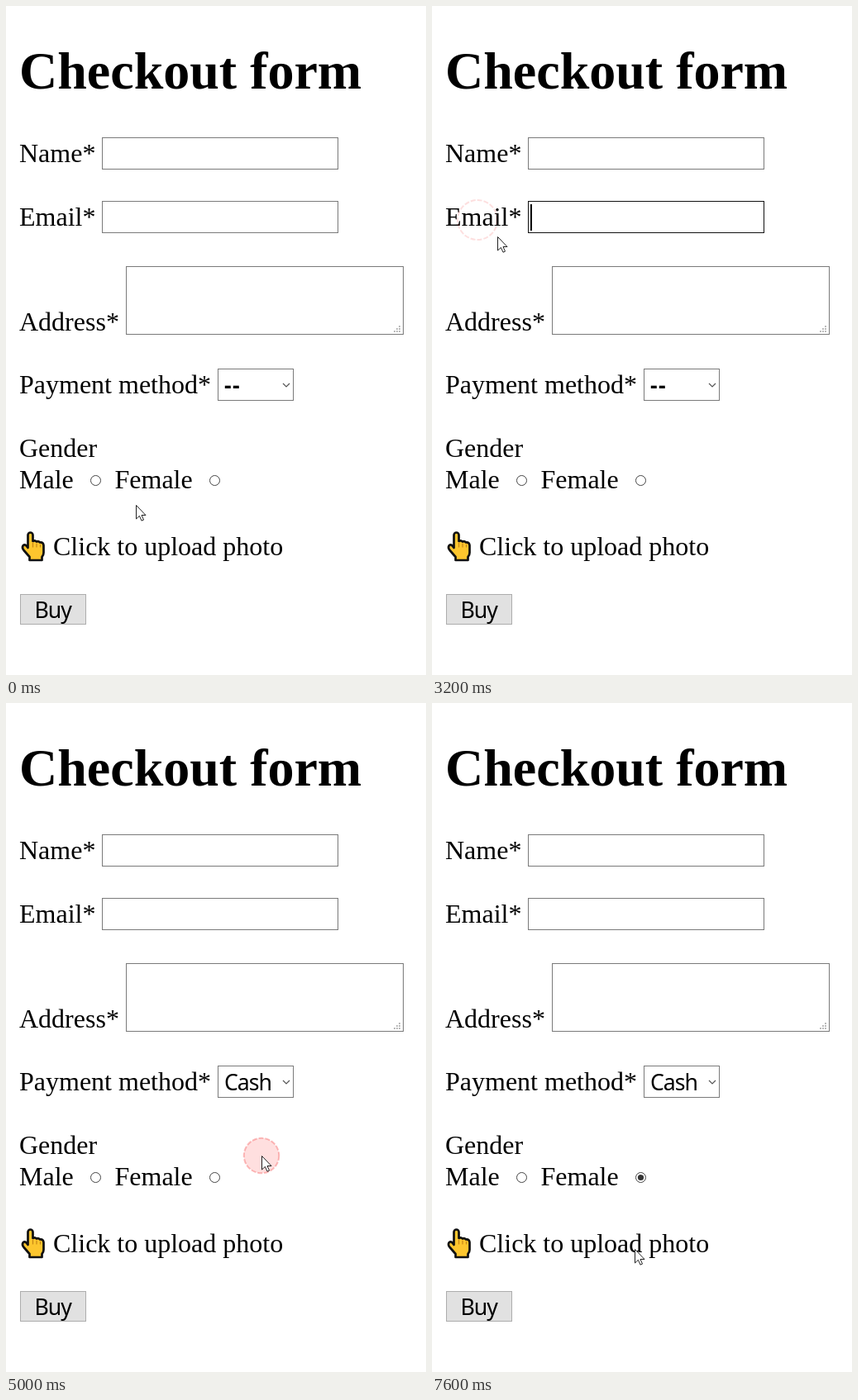
An HTML page for the animation above (8000 ms loop, 508x810 px).

```html
<!DOCTYPE html>
<html lang="en">
<head>
<meta charset="utf-8">
<title>Checkout form</title>
<style>
  html, body { margin: 0; width: 100%; height: 100%; overflow: hidden; background: #fff; }
  svg { display: block; width: 508px; height: 810px; }
  text { font: 32px "Liberation Serif", "Times New Roman", serif; }
  .title { font-size: 64px; font-weight: bold; }
  .ui { font: 26.67px "Noto Sans", "Open Sans", sans-serif; letter-spacing: -1px; }
  .dash { font-weight: 600; letter-spacing: 1.5px; }
  .field { fill: #fff; stroke: #7a7a7a; }
  .field.on { stroke: #111; }
  .radio circle:first-child { fill: #fff; stroke: #444; }
  .radio.on circle:first-child { stroke: #111; }
  .option.on rect { fill: #0078d7; }
  .option.on text { fill: #fff; }
  .off { display: none; }
</style>
</head>
<body>
<svg viewBox="0 0 508 810">
  <text class="title" x="16" y="100">Checkout form</text>
  <text x="16" y="189">Name*</text>
  <text x="16" y="266">Email*</text>
  <text x="16" y="393">Address*</text>
  <text x="16" y="469">Payment method*</text>
  <text x="16" y="546">Gender</text>
  <text x="16" y="584">Male</text>
  <text x="131.5" y="584">Female</text>
  <text x="57" y="665">Click to upload photo</text>

  <rect id="name" class="field" x="116.5" y="159.5" width="285" height="38"/>
  <rect id="email" class="field" x="116.5" y="236.5" width="285" height="38"/>
  <rect id="caret" x="119" width="2" height="32"/>

  <rect class="field" x="145.5" y="315.5" width="335" height="82"/>
  <path d="M475 388h2M472 391h2m1 0h2M469 394h2m1 0h2m1 0h2" stroke="#bbb" stroke-width="2"/>

  <rect id="pay" class="field" x="256.5" y="439.5" width="91" height="38"/>
  <rect id="drop" x="331.5" y="439.5" width="16" height="38" fill="#e5f1fb" stroke="#55748c"/>
  <path d="M335 457l4 4 4-4" fill="none" stroke="#555" stroke-width="1.2"/>
  <text id="none" class="ui dash" x="264" y="469">--</text>
  <text id="cash" class="ui" x="264" y="469">Cash</text>

  <g id="male" class="radio" transform="translate(108.5 574.5)"><circle r="6"/><circle r="3.6" fill="#333"/></g>
  <g id="female" class="radio" transform="translate(252.5 574.5)"><circle r="6"/><circle r="3.6" fill="#333"/></g>

  <g stroke="#111" stroke-width="2.7" stroke-linejoin="round" stroke-linecap="round">
    <path fill="#fdc62e" d="M26.500 656V640.500a3 3 0 0 1 6 0V648q2.500-1.500 4.500.5 2.200-1.200 4 1 4-.5 4.500 3.500V662q0 3-2 5v4H28.500v-4l-7-8q-2.500-3-1-5.500 2-2 4 0z"/>
    <path fill="none" stroke="#c88716" stroke-width="1.2" d="M32.500 650v5M37 651v4M41.500 652v3"/>
  </g>

  <rect x="17.5" y="712.5" width="79" height="36" fill="#e1e1e1" stroke="#adadad"/>
  <text class="ui" x="34.5" y="741">Buy</text>

  <g id="menu">
    <rect x="256.5" y="478.5" width="91" height="152" fill="#fff" stroke="#7a7a7a"/>
    <g class="option" transform="translate(257 479)"><rect width="90" height="50" fill="#fff"/><text class="ui dash" x="7" y="35">--</text></g>
    <g class="option" transform="translate(257 529)"><rect width="90" height="50" fill="#fff"/><text class="ui" x="7" y="35">Cash</text></g>
    <g class="option" transform="translate(257 579)"><rect width="90" height="50" fill="#fff"/><text class="ui" x="7" y="35">Card</text></g>
  </g>

  <circle id="ripple" fill="red" stroke="#f00000" stroke-width="2" stroke-dasharray="6 2"/>
  <path id="cursor" d="M.5.5V17l3.900-3.600 2.600 5.800 2.500-1.100-2.500-5.600h5z" fill="#fff" stroke="#222"/>
</svg>
<script>
const STEP = 200, LOOP = 8000;
const $ = id => document.getElementById(id);
const options = document.querySelectorAll(".option");

// Pointer stops, in steps: it glides there from start to end, then may click.
const stops = [
  { start: 0,  end: 0,  x: 157, y: 604 },
  { start: 0,  end: 4,  x: 63,  y: 169 },
  { start: 8,  end: 9,  x: 63,  y: 181, click: 11 },
  { start: 12, end: 14, x: 55,  y: 259, click: 14 },
  { start: 15, end: 20, x: 282, y: 450, click: 20 },
  { start: 21, end: 24, x: 309, y: 548, click: 24 },
  { start: 25, end: 29, x: 45,  y: 579, click: 29 },
  { start: 30, end: 31, x: 161, y: 558 },
  { start: 31, end: 32, x: 196, y: 575, click: 32 },
  { start: 33, end: 36, x: 242, y: 686 },
  { start: 36, end: 38, x: 245, y: 661 }
];

const show = (el, on) => el.classList.toggle("off", !on);
const mark = (el, on) => el.classList.toggle("on", on);
const ease = t => t * t * (3 - 2 * t);

function set(el, attrs) {
  for (const key in attrs) el.setAttribute(key, attrs[key]);
}

function pointer(s) {
  const i = stops.findLastIndex(p => p.start <= s);
  const to = stops[i], from = stops[i - 1];
  const k = ease(Math.min(1, (s - to.start) / (to.end - to.start)));
  const mix = key => Math.round(from[key] + (to[key] - from[key]) * k);
  set($("cursor"), { transform: `translate(${mix("x")} ${mix("y")})` });
}

// A click is a red dot that grows into a fading dashed ring over three steps.
function ripple(s) {
  const stop = stops.find(p => s >= p.click && s < p.click + 3);
  show($("ripple"), stop);
  if (!stop) return;
  const age = s - stop.click, fade = (1 - age / 2) ** 3;
  set($("ripple"), {
    cx: stop.x, cy: stop.y, r: 24 - 22 * fade,
    "fill-opacity": fade, "stroke-opacity": .5 / 2 ** age
  });
}

function form(s) {
  const within = (a, b) => s >= a && s < b;

  mark($("name"), within(4, 15));
  mark($("email"), within(14, 20));
  show($("caret"), within(12, 20));
  set($("caret"), { y: s < 15 ? 163 : 240 });

  mark($("pay"), within(19, 25));
  show($("drop"), within(19, 23));
  show($("none"), s < 25);
  show($("cash"), s >= 25);
  show($("menu"), within(21, 25));
  options.forEach((o, i) => mark(o, i === (s < 23 ? 0 : 1)));

  mark($("male"), within(29, 31));
  mark($("female"), within(32, 35));
  show($("male").lastChild, within(30, 33));
  show($("female").lastChild, s >= 33);
}

function tick() {
  const s = Math.floor(performance.now() % LOOP / STEP);
  pointer(s);
  ripple(s);
  form(s);
  requestAnimationFrame(tick);
}
tick();
</script>
</body>
</html>
```
